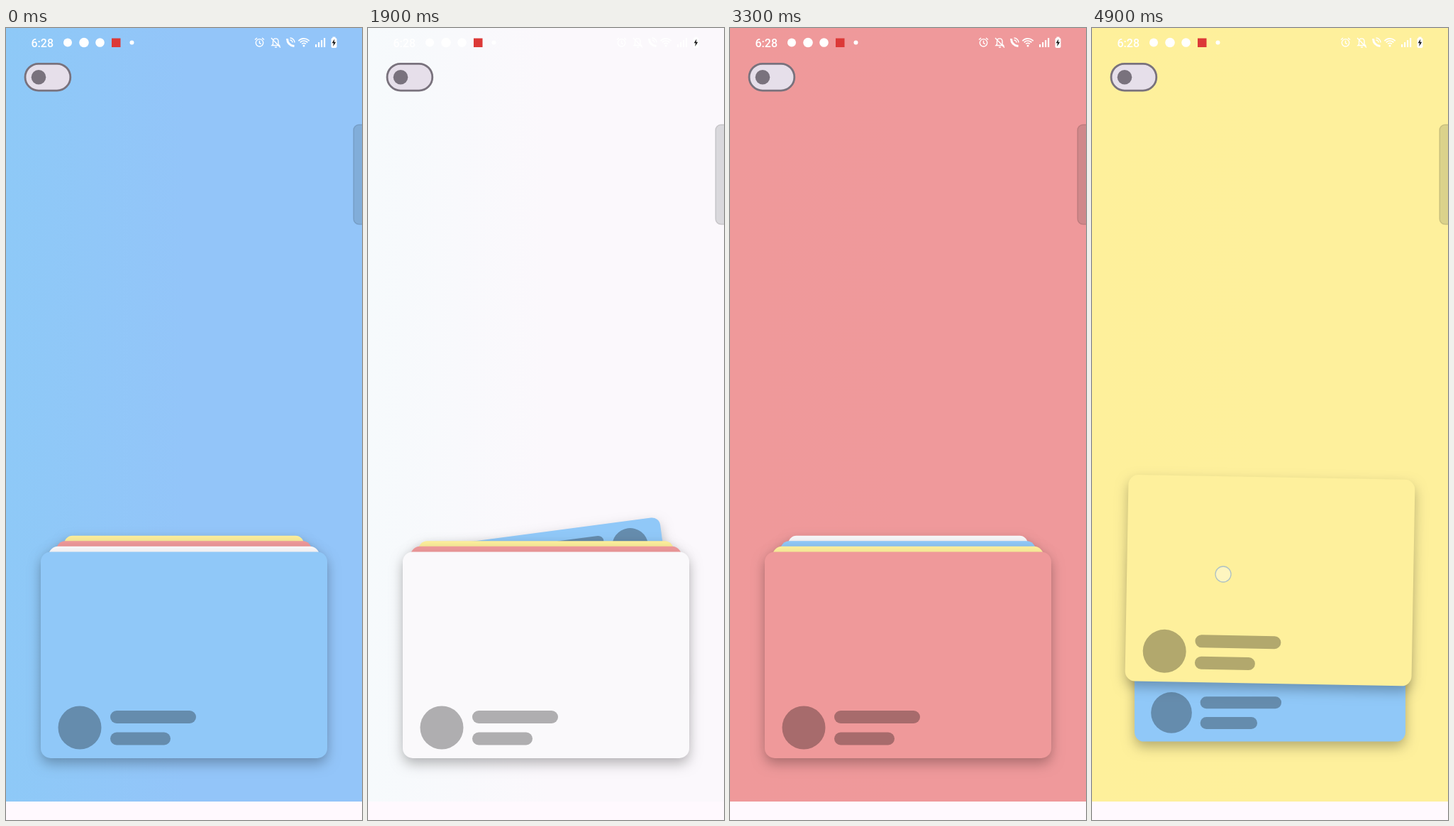
These frames come from a looping animation (502 px wide and 1115 px high, 5 s). An HTML page with a canvas:

```html
<!DOCTYPE html>
<html lang="en">
<head>
<meta charset="utf-8">
<title>Card stack</title>
<style>
html, body { margin: 0; width: 100%; height: 100%; overflow: hidden; background: #fff9fe; }
canvas { display: block; }
</style>
</head>
<body>
<canvas id="stage" width="502" height="1115"></canvas>
<script>
const ctx = document.getElementById('stage').getContext('2d');
const LOOP = 5000, STEP = 100, FLIGHT = 700;
const CX = 251, CY = 882.7, CARD_W = 404, CARD_H = 290.5;
const APEX_Y = 323, APEX_P = 0.42, SWING = 61;

const themes = [
  { card: [144, 200, 248], left: [142, 201, 247], right: [147, 197, 249] },
  { card: [250, 249, 251], left: [247, 250, 252], right: [252, 248, 252] },
  { card: [239, 153, 154], left: [239, 153, 154], right: [239, 153, 155] },
  { card: [254, 240, 156], left: [254, 240, 155], right: [254, 240, 156] }
];

// keys: time, lift, tilt in degrees, finger x, finger y
const swipes = [
  { release: 1230, fade: 5, keys: [[1200, 200, 2, 175, 690], [1230, 270, 4, 174, 640]] },
  { release: 2544, fade: 15, keys: [[2300, 0, 0, 176, 876], [2400, 14, 1.03, 177, 862],
    [2500, 190, 2.5, 174, 710], [2544, 280, 4, 172, 640]] },
  { release: 4005, fade: 15, keys: [[3500, 0, 0, 176, 887], [3600, 20, 1, 175, 865],
    [3700, 180, 3, 171, 735], [3800, 344.5, 6.6, 168, 594], [4005, 380, 7, 168, 570]] },
  { release: 9999, fade: 15, keys: [[4800, 14, 1, 184, 860], [4900, 105, 1.03, 185, 769]] }
];

const clamp = v => Math.max(0, Math.min(1, v));
const lerp = (a, b, k) => a + (b - a) * k;
const mix = (a, b, k) => a.map((v, i) => lerp(v, b[i], k));
const rgb = c => `rgb(${c.map(Math.round).join(',')})`;
const easeOut = u => 1 - (1 - u) * (1 - u);
const easeInOut = u => u < 0.5 ? 2 * u * u : 1 - 2 * (1 - u) * (1 - u);
const slotScale = s => 1 - s * 0.0545;
const slotY = s => CY - s * 15.5;

function sample(keys, t) {
  if (t < keys[0][0]) return null;
  const i = keys.findIndex(k => k[0] > t);
  if (i < 0) return keys[keys.length - 1];
  const a = keys[i - 1], b = keys[i];
  return mix(a, b, (t - a[0]) / (b[0] - a[0]));
}

function box(x, y, w, h, r) {
  ctx.beginPath();
  ctx.roundRect(x, y, w, h, r);
}

function disc(x, y, r) {
  ctx.beginPath();
  ctx.arc(x, y, r, 0, Math.PI * 2);
}

function line(...p) {
  ctx.beginPath();
  for (let i = 0; i < p.length; i += 2) ctx.lineTo(p[i], p[i + 1]);
  ctx.stroke();
}

function drawCard(theme, x, y, scale, deg) {
  ctx.save();
  ctx.translate(x, y);
  ctx.rotate(deg * Math.PI / 180);
  ctx.scale(scale, scale);
  ctx.save();
  ctx.shadowColor = 'rgba(0,0,0,0.27)';
  ctx.shadowBlur = 17;
  ctx.shadowOffsetY = 8;
  ctx.fillStyle = rgb(theme.card);
  box(-CARD_W / 2, -CARD_H / 2, CARD_W, CARD_H, 14);
  ctx.fill();
  ctx.restore();
  ctx.fillStyle = 'rgba(0,0,0,0.3)';
  disc(-147, 102.3, 30.5);
  ctx.fill();
  box(-104, 78.3, 121, 18, 9);
  ctx.fill();
  box(-104, 108.8, 85, 18, 9);
  ctx.fill();
  ctx.restore();
}

function drawBackground(a, b, k) {
  const g = ctx.createLinearGradient(0, 0, 502, 0);
  g.addColorStop(0, rgb(mix(a.left, b.left, k)));
  g.addColorStop(0.5, rgb(mix(a.right, b.right, k)));
  ctx.fillStyle = '#fff9fe';
  ctx.fillRect(0, 0, 502, 1115);
  ctx.fillStyle = g;
  ctx.fillRect(0, 0, 502, 1089);
}

function drawStatus() {
  ctx.fillStyle = ctx.strokeStyle = '#fff';
  ctx.lineWidth = 1.4;
  ctx.font = '500 16px Roboto, sans-serif';
  ctx.fillText('6:28', 35.5, 26.5);
  for (const [x, r] of [[87, 6], [110, 6.8], [132.5, 6.3], [177.5, 3]]) {
    disc(x, 20.5, r);
    ctx.fill();
  }
  ctx.fillStyle = '#dc3937';
  ctx.fillRect(149, 14.5, 12.5, 12.5);

  // alarm
  disc(357.5, 20.8, 5.2);
  ctx.stroke();
  line(357.5, 17.8, 357.5, 21.3, 359.8, 22.6);
  line(351, 16.5, 354, 14);
  line(361, 14, 364, 16.5);
  // muted bell
  ctx.beginPath();
  ctx.moveTo(375, 24.5);
  ctx.lineTo(376.5, 23);
  ctx.lineTo(376.5, 19);
  ctx.bezierCurveTo(376.5, 13.5, 384, 13.5, 384, 19);
  ctx.lineTo(384, 23);
  ctx.lineTo(385.5, 24.5);
  ctx.closePath();
  ctx.stroke();
  line(374, 14, 387, 27.5);
  line(379, 27, 382, 27);
  // call
  ctx.lineWidth = 3;
  ctx.beginPath();
  ctx.moveTo(396.5, 15);
  ctx.quadraticCurveTo(397, 24.5, 406.5, 25.5);
  ctx.stroke();
  ctx.lineWidth = 1.4;
  for (const r of [3.5, 6.5]) {
    ctx.beginPath();
    ctx.arc(400.5, 20.5, r, -Math.PI / 2, 0);
    ctx.stroke();
  }
  // wifi
  ctx.lineWidth = 1.7;
  for (const r of [3.7, 7, 10.2]) {
    ctx.beginPath();
    ctx.arc(420, 25, r, -Math.PI * 0.77, -Math.PI * 0.23);
    ctx.stroke();
  }
  ctx.fillStyle = '#fff';
  disc(420, 25, 1.5);
  ctx.fill();
  // signal
  for (let i = 0; i < 4; i++) {
    const h = 4 + i * 3;
    ctx.fillRect(436 + i * 4, 27 - h, 2.2, h);
  }
  // battery
  box(458.5, 14, 8, 14, 2);
  ctx.fill();
  ctx.fillRect(460.5, 12.5, 4, 2);
  ctx.fillStyle = '#191919';
  ctx.beginPath();
  for (const [x, y] of [[463.3, 15.5], [459.6, 21.2], [462, 21.2], [461.2, 26], [465.2, 19.8], [462.7, 19.8]]) ctx.lineTo(x, y);
  ctx.fill();
}

function drawControls() {
  ctx.fillStyle = '#e6dfea';
  ctx.strokeStyle = '#79727d';
  ctx.lineWidth = 2.8;
  box(27, 50.3, 63.8, 37.8, 18.9);
  ctx.fill();
  ctx.stroke();
  ctx.fillStyle = '#79727d';
  disc(46, 69.2, 10.3);
  ctx.fill();

  ctx.fillStyle = 'rgba(40,50,50,0.16)';
  ctx.strokeStyle = 'rgba(0,0,0,0.13)';
  ctx.lineWidth = 1.5;
  box(490, 136, 30, 140.5, 8);
  ctx.fill();
  ctx.stroke();
}

function drawFinger(x, y, outline) {
  disc(x, y, 11);
  ctx.fillStyle = 'rgba(255,255,255,0.36)';
  ctx.fill();
  ctx.strokeStyle = outline;
  ctx.lineWidth = 1.3;
  ctx.stroke();
}

function render(t) {
  let n = 0;
  swipes.forEach((s, i) => { if (t >= s.keys[0][0]) n = i; });
  const { release, fade, keys } = swipes[n];
  const age = (t - release) / FLIGHT;
  const p = clamp(age);
  const flying = age > 0;
  const drag = sample(keys, t);
  const advance = clamp(p / 0.3);
  const theme = i => themes[(n + i) % 4];

  drawBackground(theme(0), theme(1), flying ? 1 - Math.exp(-age * fade) : 0);
  drawStatus();
  drawControls();

  const drawTop = () => {
    if (!flying) {
      drawCard(theme(0), CX, CY - (drag ? drag[1] : 0), 1, drag ? drag[2] : 0);
      return;
    }
    const [, lift, tilt] = keys[keys.length - 1];
    const deg = lerp(tilt, 180, p);
    const y = p < APEX_P
      ? lerp(CY - lift, APEX_Y, easeOut(p / APEX_P))
      : lerp(APEX_Y, slotY(3), easeInOut((p - APEX_P) / (1 - APEX_P)));
    const x = CX + SWING * Math.sin(deg * Math.PI / 180);
    drawCard(theme(0), x, y, lerp(1, slotScale(3), advance), deg);
  };

  // past the apex the thrown card drops behind the stack
  const behind = p > 0.5;
  if (behind) drawTop();
  for (let i = 3; i > 0; i--) {
    const slot = i - advance;
    drawCard(theme(i), CX, slotY(slot), slotScale(slot), 0);
  }
  if (!behind) drawTop();

  if (drag && !flying && t < 3900 || drag && t >= 4800) {
    drawFinger(drag[3], drag[4], n === 2 ? 'rgba(255,255,255,0.25)' : 'rgba(95,145,220,0.5)');
  }
}

const start = performance.now();
function tick() {
  const t = (performance.now() - start) % LOOP;
  render(Math.floor(t / STEP) * STEP);
  requestAnimationFrame(tick);
}
tick();
</script>
</body>
</html>
```
